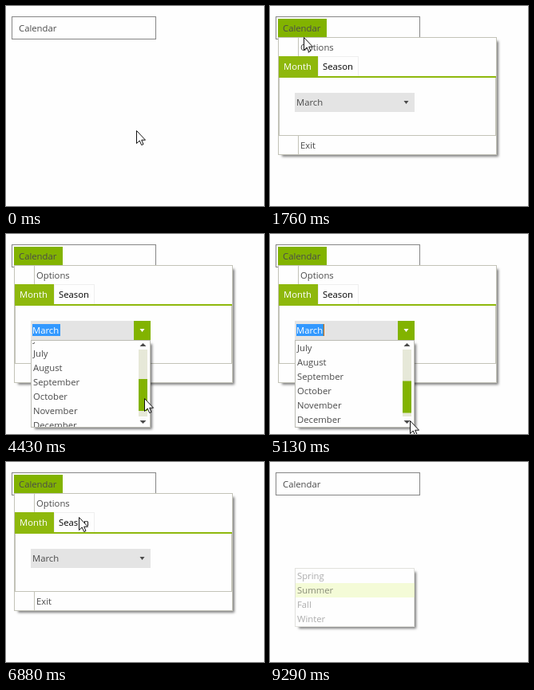
Recreate the animation shown at these times as an HTML page with a canvas. Size 323 by 251 pixels, loop 9.39 s.

```html
<!DOCTYPE html>
<html lang="en">
<head>
<meta charset="utf-8">
<title>Calendar menu</title>
<style>
  html, body { margin: 0; width: 100%; height: 100%; overflow: hidden; background: #fefefe; }
  canvas { display: block; }
</style>
</head>
<body>
<canvas id="stage" width="323" height="251"></canvas>
<script>
const ctx = document.getElementById('stage').getContext('2d', { alpha: false });

const LOOP = 9390;
const BLINK = 515;
const STEP = 138;
const ROW = 18;
const SCROLL = 6 * ROW;
const TRAVEL = 39.5;
const FADED = .45;

const PAPER = '#fefefe';
const GREEN = '#82b300';
const TAB = '#8eb80c';
const GRAY = '#4a4a4a';
const LINE = '#c3c3b8';

const MONTHS = ['January', 'February', 'March', 'April', 'May', 'June', 'July',
  'August', 'September', 'October', 'November', 'December'];
const SEASONS = ['Spring', 'Summer', 'Fall', 'Winter'];

// When the interface reacts
const MENU_OPEN = 1070, MENU_CLOSE = 9290;
const MONTH_OPEN = 2720, MONTH_CLOSE = 6090, MONTH_GONE = 6230;
const GRAB = 3980, RELEASE = 5540;
const TAB_SWITCH = 7030, SEASON_OPEN = 7910;
const LEAVE_MONTH = 3680, LEAVE_SEASON = 8310;

// Where the pointer rests
const START = { x: 163, y: 156 };
const GRIP = { x: 173, y: 169 };
const GLIDES = [
  { from: 280, to: 670, x: 37, y: 32 },
  { from: 1760, to: 2450, x: 175, y: 123 },
  { from: LEAVE_MONTH, to: GRAB, ...GRIP },
  { from: 4130, to: 4850, x: GRIP.x, y: 243 },
  { from: 5130, to: 5820, x: 220, y: 128 },
  { from: MONTH_GONE, to: 6900, x: 86, y: 64 },
  { from: 7490, to: 7770, x: 173, y: 128 },
  { from: LEAVE_SEASON, to: 8700, x: 195, y: 190 }
];

const ARROW = new Path2D('M.5 .5v16l3.7-3.5 2.5 5.5 2.3-1-2.3-5.3h4.8z');

const within = (t, a, b) => t >= a && t < b;
const clamp = (v, a, b) => Math.min(b, Math.max(a, v));
const smooth = u => u * u * (3 - 2 * u);
const smoother = u => u * u * u * (10 - 15 * u + 6 * u * u);

// Glides advance in even steps; x starts more gently than y, which bends the path
function pointerAt(t) {
  let { x, y } = START;
  for (const g of GLIDES) {
    if (t < g.from) break;
    const gaps = Math.round((g.to - g.from) / STEP);
    const done = Math.floor((t - g.from) / (g.to - g.from) * gaps + 1e-6) + 1;
    const u = Math.min(1, done / (gaps + 1));
    x += (g.x - x) * smoother(u);
    y += (g.y - y) * smooth(u);
  }
  return { x: Math.round(x), y: Math.round(y) };
}

function box(x, y, w, h, color) {
  ctx.fillStyle = color;
  ctx.fillRect(x, y, w, h);
}

function frame(x, y, w, h, color) {
  ctx.strokeStyle = color;
  ctx.lineWidth = 1;
  ctx.strokeRect(x + .5, y + .5, w - 1, h - 1);
}

function label(text, x, y, color = GRAY) {
  ctx.fillStyle = color;
  ctx.fillText(text, x, y);
}

function triangle(cx, y, half, h, color) {
  ctx.fillStyle = color;
  ctx.beginPath();
  ctx.moveTo(cx - half, y);
  ctx.lineTo(cx + half, y);
  ctx.lineTo(cx, y + h);
  ctx.fill();
}

function panel(x, y, w, h) {
  ctx.save();
  ctx.shadowColor = 'rgba(0,0,0,.5)';
  ctx.shadowBlur = 3;
  ctx.shadowOffsetX = ctx.shadowOffsetY = 2;
  box(x + 3, y + 3, w - 3, h - 3, PAPER);
  ctx.restore();
  box(x, y, w, h, PAPER);
}

function drawTab(text, x, w, active) {
  if (active) box(x, 63, w, 26, TAB);
  else frame(x, 63, w, 26, '#efefef');
  label(text, x + 6, 80, active ? '#fff' : '#000');
}

function drawMenu(season) {
  panel(10, 39, 274, 148);
  frame(10, 39, 274, 148, LINE);
  for (const y of [40, 163]) box(35, y, 1, 23, LINE);
  label('Options', 38, 56);
  label('Exit', 38, 179);
  frame(11, 88, 272, 75, LINE);
  drawTab('Month', 11, 49, !season);
  drawTab('Season', 60, 51, season);
  box(11, 88, 272, 2, TAB);
}

function drawCombo(text, caretX, open, hover, caret) {
  box(31, 109, 150, 24, hover ? '#f0f0f0' : '#e4e4e4');
  if (open) {
    box(160, 109, 21, 24, GREEN);
    box(33, 113, caretX - 32, 15, '#3399ff');
  }
  label(text, 33, 125, open ? '#fff' : GRAY);
  if (caret) box(caretX, 113, 1, 15, '#cc6600');
  triangle(170.5, 119, 3, 4, open ? '#fff' : GRAY);
}

function drawScrollbar(offset, dragging) {
  box(164, 134, 16, SCROLL, PAPER);
  box(166, 145, 11, 84, '#e6e8d8');
  box(166, 145 + offset, 11, 40, dragging ? GREEN : '#585858');
  triangle(171.5, 141, 4, -4, GRAY);
  triangle(171.5, 234, 4, 4, GRAY);
}

function drawList(items, chosen, alpha, offset = 0, dragging = false) {
  const rows = Math.min(6, items.length);
  const scrolls = items.length > rows;
  const h = rows * ROW;
  const scroll = Math.round(offset / TRAVEL * SCROLL);
  panel(31, 133, 150, h + 2);
  ctx.save();
  ctx.globalAlpha = alpha;
  frame(31, 133, 150, h + 2, '#bcbcb4');
  ctx.beginPath();
  ctx.rect(32, 136, 149, h - 2);
  ctx.clip();
  items.forEach((item, i) => {
    const y = 134 + i * ROW - scroll;
    if (i === chosen) box(32, y, scrolls ? 131 : 149, ROW, '#e6f5a6');
    label(item, 34, y + 13, i === chosen ? '#000' : GRAY);
  });
  if (scrolls) drawScrollbar(offset, dragging);
  ctx.restore();
}

function drawPointer({ x, y }) {
  ctx.save();
  ctx.translate(x, y);
  ctx.fillStyle = '#fff';
  ctx.strokeStyle = '#111';
  ctx.lineWidth = 1;
  ctx.fill(ARROW);
  ctx.stroke(ARROW);
  ctx.restore();
}

function draw(t) {
  const pointer = pointerAt(t);
  const menuOpen = within(t, MENU_OPEN, MENU_CLOSE);
  const season = t >= TAB_SWITCH;
  const monthOpen = within(t, MONTH_OPEN, MONTH_CLOSE);
  const seasonOpen = within(t, SEASON_OPEN, MENU_CLOSE);
  const open = monthOpen || seasonOpen;
  const hover = within(t, MONTH_OPEN, LEAVE_MONTH) || within(t, SEASON_OPEN, LEAVE_SEASON);
  const since = t - (season ? SEASON_OPEN : MONTH_OPEN);
  const caret = open && Math.floor(since / BLINK) % 2 === 0;

  ctx.font = '11.3px "Open Sans", "Noto Sans", sans-serif';
  box(0, 0, 323, 251, PAPER);
  frame(7, 13, 181, 29, '#868686');
  if (menuOpen) box(10, 16, 61, 24, GREEN);
  label('Calendar', 16, 32);

  if (menuOpen) {
    drawMenu(season);
    drawCombo(season ? 'Summer' : 'March', season ? 78 : 67, open, hover, caret);
  }
  if (within(t, MONTH_OPEN, MONTH_GONE)) {
    const dragging = within(t, GRAB, RELEASE);
    const offset = dragging ? clamp(pointer.y - GRIP.y, 0, TRAVEL) : 0;
    drawList(MONTHS, 2, monthOpen ? 1 : FADED, offset, dragging);
  }
  if (t >= SEASON_OPEN) drawList(SEASONS, 1, seasonOpen ? 1 : FADED);
  if (t < MENU_CLOSE) drawPointer(pointer);
}

const begin = performance.now();
function tick() {
  draw((performance.now() - begin) % LOOP);
  requestAnimationFrame(tick);
}
tick();
</script>
</body>
</html>
```
